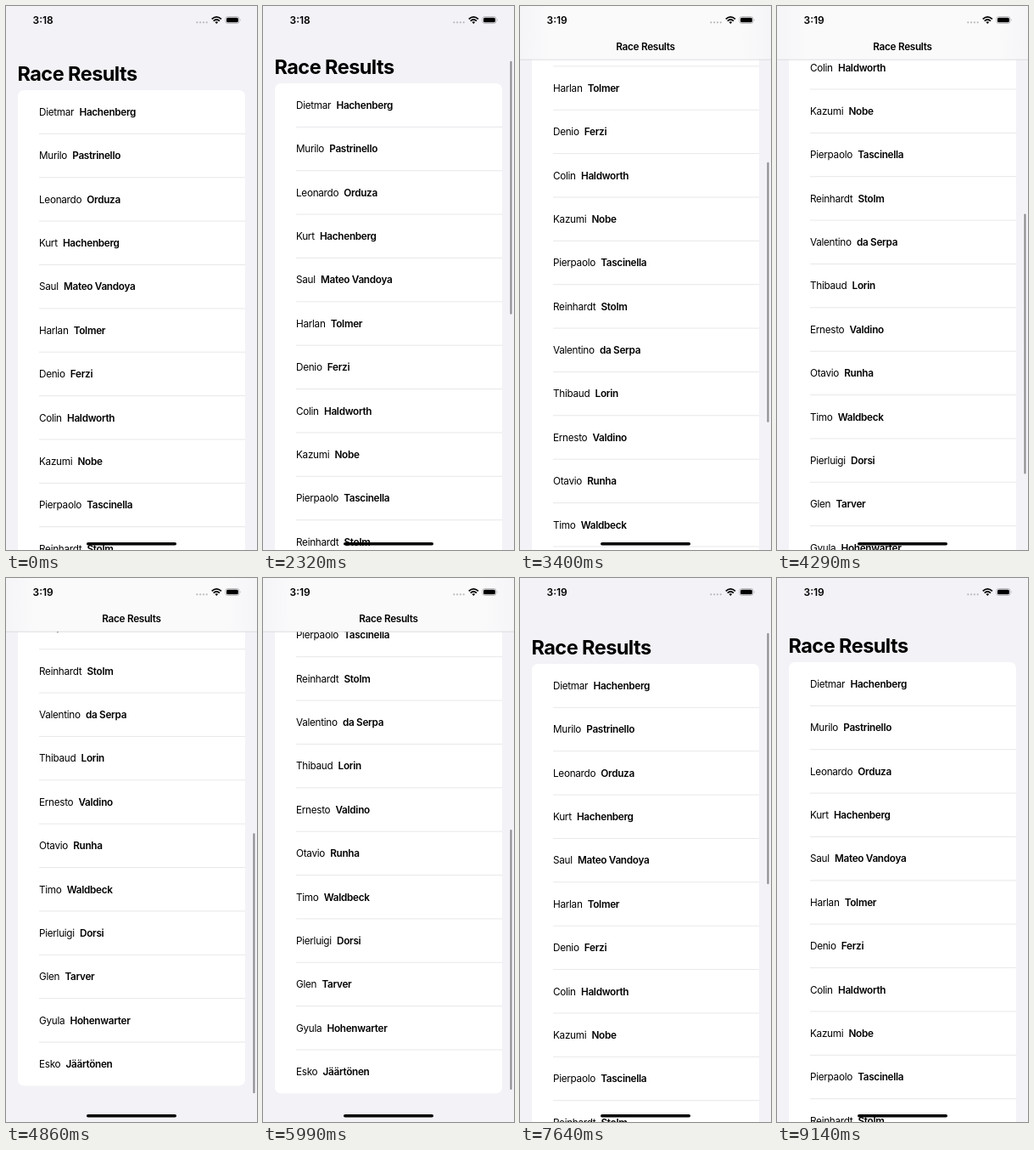
Recreate the animation shown at these times as an HTML page. Size 296x640 px, loop 9.2 s.

```html
<!DOCTYPE html>
<html lang="en">
<head>
<meta charset="utf-8">
<title>Race Results</title>
<style>
  html, body { margin: 0; width: 100%; height: 100%; overflow: hidden; background: #f2f2f7; }
  svg { display: block; width: 100%; height: 100%; }
  text { font-family: Inter, Roboto, sans-serif; font-size: 11.76px; letter-spacing: -.3px; fill: #000; }
  .bold { font-weight: 600; }
  .large { font-size: 23.5px; font-weight: 700; letter-spacing: -.55px; }
  .clock { font-size: 12px; font-weight: 600; letter-spacing: 0; }
</style>
</head>
<body>
<svg viewBox="0 0 296 640" xmlns="http://www.w3.org/2000/svg">
  <defs>
    <clipPath id="below"><rect y="63" width="296" height="577"/></clipPath>
    <linearGradient id="glass">
      <stop offset="0" stop-color="#f5f5f8"/>
      <stop offset=".12" stop-color="#fafafb"/>
      <stop offset=".88" stop-color="#fafafb"/>
      <stop offset="1" stop-color="#f5f5f8"/>
    </linearGradient>
  </defs>
  <rect width="296" height="640" fill="#f2f2f7"/>
  <g clip-path="url(#below)">
    <g id="list">
      <text class="large" x="13.5" y="88">Race Results</text>
    </g>
  </g>
  <g id="bar">
    <rect width="296" height="63" fill="url(#glass)"/>
    <path d="M0 63.2H296" stroke="#d2d2d6" stroke-width=".7"/>
  </g>
  <text id="title" class="bold" x="148" y="52" text-anchor="middle">Race Results</text>
  <rect id="thumb" x="291.4" width="2.1" rx="1.05" fill="#8b8b8e"/>

  <text id="clock" class="clock" x="31.5" y="21"></text>
  <g fill="#b9b9bd">
    <circle cx="225.3" cy="19.3" r="1.1"/><circle cx="229.1" cy="19.3" r="1.1"/>
    <circle cx="232.9" cy="19.3" r="1.1"/><circle cx="236.7" cy="19.3" r="1.1"/>
  </g>
  <g fill="none" stroke="#000" stroke-width="1.7">
    <path d="M242.7 15.4Q248.3 10.4 253.9 15.4"/>
    <path d="M244.7 17.6Q248.3 14.4 251.9 17.6"/>
  </g>
  <path d="M246.5 19.1Q248.3 17.6 250.1 19.1L248.3 21Z"/>
  <rect x="258.9" y="12.6" width="16" height="7.8" rx="2.4" fill="none" stroke="#9a9a9e" stroke-width=".7"/>
  <rect x="260" y="13.7" width="13.8" height="5.6" rx="1.5"/>
  <path d="M275.9 15.2Q277.2 16.5 275.9 17.8Z" fill="#9a9a9e"/>
  <rect x="95" y="630.9" width="106" height="3.6" rx="1.8"/>
</svg>
<script>
const LOOP = 9200, ROW = 51.37, TOP = 99, COLLAPSE = 36;

const drivers = `Dietmar|Hachenberg
Murilo|Pastrinello
Leonardo|Orduza
Kurt|Hachenberg
Saul|Mateo Vandoya
Harlan|Tolmer
Denio|Ferzi
Colin|Haldworth
Kazumi|Nobe
Pierpaolo|Tascinella
Reinhardt|Stolm
Valentino|da Serpa
Thibaud|Lorin
Ernesto|Valdino
Otavio|Runha
Timo|Waldbeck
Pierluigi|Dorsi
Glen|Tarver
Gyula|Hohenwarter
Esko|Jäärtönen`.split("\n").map(line => line.split("|"));

// Scroll offset over time: two flicks down, one flick back up.
const keys = [
  [2215, 0], [2320, 8], [2425, 50], [2530, 105], [2740, 182], [2950, 232],
  [3170, 264], [3386, 285], [3810, 300], [4000, 300], [4080, 308], [4192, 360],
  [4305, 412], [4530, 482], [4760, 520], [4870, 529], [5090, 527], [5190, 526],
  [5900, 526], [5990, 520], [6100, 478], [6425, 300], [6750, 145], [6980, 70],
  [7200, 20], [7415, -4], [7630, -2], [7880, 0]
];

// Runs of stepped motion: first step, last step, number of steps.
const runs = [
  [2320, 3160, 9], [3280, 3810, 6], [4080, 4980, 9], [5090, 5190, 2],
  [5990, 6860, 9], [6980, 7740, 8], [7880, 7880, 1], [9020, 9140, 2]
];

const $ = id => document.getElementById(id);
const clamp = (v, lo = 0, hi = 1) => Math.min(hi, Math.max(lo, v));

function add(parent, tag, attrs, content = "") {
  const el = document.createElementNS("http://www.w3.org/2000/svg", tag);
  for (const name in attrs) el.setAttribute(name, attrs[name]);
  el.textContent = content;
  return parent.appendChild(el);
}

function buildList() {
  const list = $("list");
  add(list, "rect", { x: 14, y: TOP, width: 268, height: ROW * drivers.length, rx: 7, fill: "#fff" });
  drivers.forEach(([first, last], i) => {
    const y = TOP + i * ROW;
    if (i) add(list, "path", { d: `M39 ${y}H282`, stroke: "#dedee1", "stroke-width": .7 });
    const label = add(list, "text", { x: 39, y: y + 30 });
    add(label, "tspan", {}, first);
    add(label, "tspan", { class: "bold", dx: 6.2 }, last);
  });
}

// Time of the step that is on screen at t.
function stepTime(t) {
  let held = 0;
  for (const [start, end, count] of runs) {
    if (t < start) break;
    const gap = count > 1 ? (end - start) / (count - 1) : 1;
    held = start + gap * Math.min(count - 1, Math.floor((t - start) / gap + .2));
  }
  return held;
}

const slope = i => (keys[i + 1][1] - keys[i][1]) / (keys[i + 1][0] - keys[i][0]);

function tangent(i) {
  if (i === 0 || i === keys.length - 1) return 0;
  const a = slope(i - 1), b = slope(i);
  return a * b > 0 ? 2 * a * b / (a + b) : 0;
}

// Monotone cubic through the keys.
function scrollAt(t) {
  const i = keys.findIndex(key => key[0] > t) - 1;
  if (i < 0) return 0;
  const [t0, s0] = keys[i], [t1, s1] = keys[i + 1];
  const h = t1 - t0, u = (t - t0) / h, v = 1 - u;
  return v * v * (1 + 2 * u) * s0 + u * u * (3 - 2 * u) * s1
    + h * u * v * (v * tangent(i) - u * tangent(i + 1));
}

function render(t) {
  const now = stepTime(t), s = scrollAt(now);
  $("list").setAttribute("transform", `translate(0 ${-s})`);
  $("bar").setAttribute("opacity", clamp((s - COLLAPSE + 2) / 8));
  $("title").setAttribute("opacity", clamp((s - 26) / 10));
  $("clock").textContent = t < 2740 ? "3:18" : "3:19";

  const thumb = $("thumb");
  thumb.setAttribute("y", Math.max(64.8, 47.5 + .478 * s));
  thumb.setAttribute("height", clamp(296 + .25 * s, 290, 306));
  thumb.setAttribute("opacity", now < 2320 || now >= 9140 ? 0 : now >= 9020 ? .5 : 1);
}

buildList();
const begin = performance.now();
(function tick() {
  render((performance.now() - begin) % LOOP);
  requestAnimationFrame(tick);
})();
</script>
</body>
</html>
```
